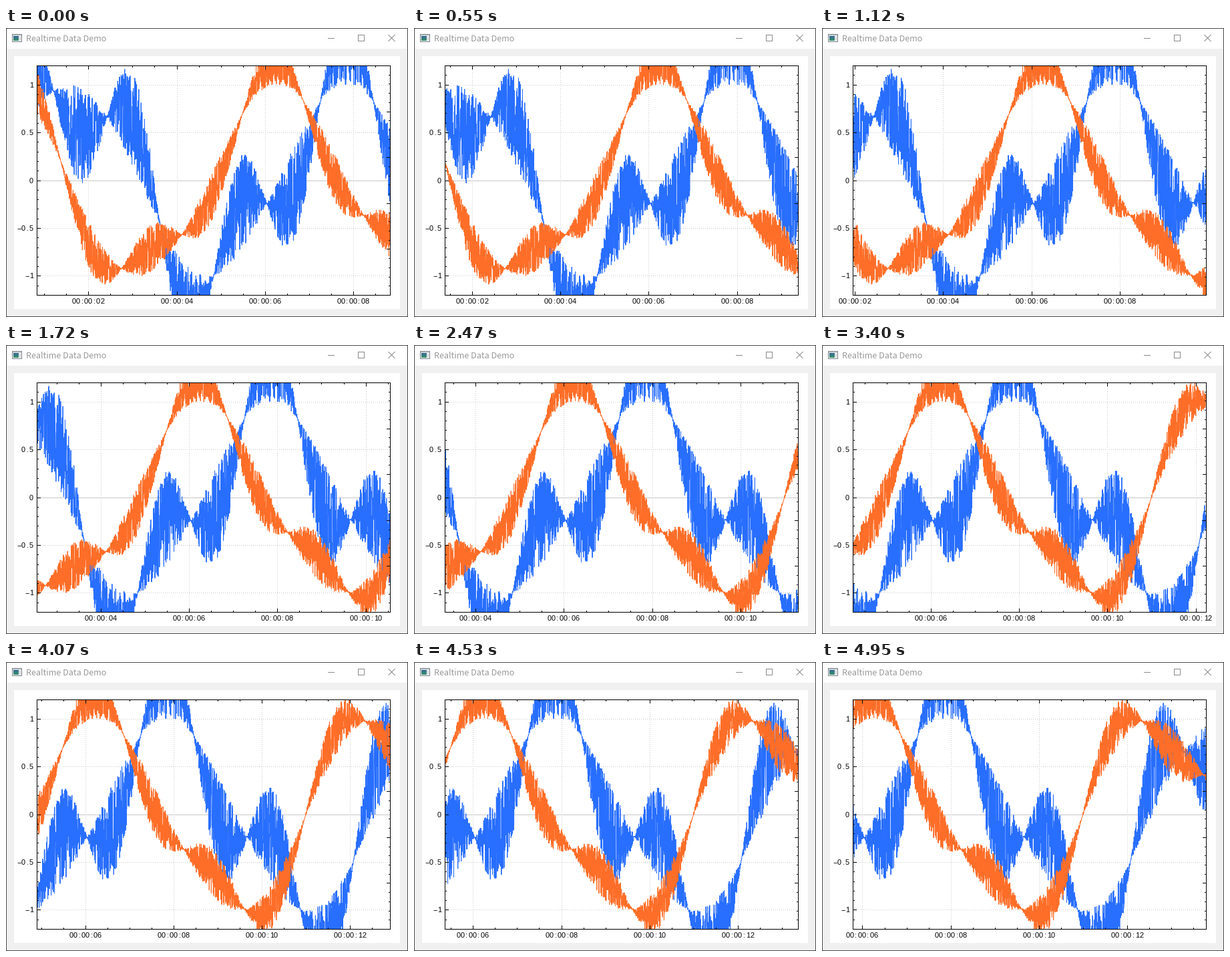
Animation of 602x432 px, one loop 5.05 s. Source, as a matplotlib script:

```python
import numpy as np
import matplotlib.pyplot as plt
from matplotlib.animation import FuncAnimation
from matplotlib.collections import LineCollection
from matplotlib.patches import Rectangle

W, H, DPI = 602, 432, 100
PX = 72 / DPI                      # one pixel in points
LOOP, INTERVAL = 5050, 25          # ms

# Plot area: axis lines sit on these pixel columns and rows
LEFT, RIGHT, TOP, BOTTOM = 46, 575, 56, 399
SPAN = 8.0                         # visible seconds
X_SCALE = (RIGHT - LEFT) / SPAN
START_KEY = 8.831                  # newest sample time at the start of the loop

BLUE, ORANGE = "#286eff", "#ff6e28"
GRID = "#c8c8c8"
BUTTON = "#8a8a8a"

# Replot bursts: first step, last step, number of steps
BURSTS = [(30, 550, 12), (600, 1120, 12), (1150, 1670, 12), (1720, 2230, 12),
          (2280, 2800, 12), (2850, 3370, 12), (3400, 3920, 12),
          (3970, 4480, 12), (4530, 4950, 10)]
STEPS = np.concatenate(
    [[0]] + [10 * np.ceil(np.linspace(a, b, n) / 10 - 1e-6) for a, b, n in BURSTS])

fig = plt.figure(figsize=(W / DPI, H / DPI), dpi=DPI, facecolor="#f0f0f0")
ax = fig.add_axes([0, 0, 1, 1])
ax.set_xlim(0, W)
ax.set_ylim(H, 0)
ax.axis("off")


def rect(x, y, w, h, color, z=0):
    patch = Rectangle((x, y), w, h, fc=color, ec="none", lw=0,
                      antialiased=False, zorder=z)
    ax.add_patch(patch)
    return patch


def strokes(segments, color, z, **kw):
    lines = LineCollection(segments, colors=color, linewidths=PX, zorder=z, **kw)
    lines.set_snap(False)
    ax.add_collection(lines, autolim=False)
    return lines


def hline(y, x0, x1):
    return [(x0, y + 0.5), (x1, y + 0.5)]


def vline(x, y0, y1):
    return [(x + 0.5, y0), (x + 0.5, y1)]


def y_pixel(value, low=-1.2, high=1.2):
    return BOTTOM - (value - low) / (high - low) * (BOTTOM - TOP)


def nearest(v):
    return int(np.floor(v + 0.5))


class CellLabel:
    """Text set in fixed 6 px character cells."""

    CELL = 6

    def __init__(self, length):
        self.chars = [ax.text(0, 0, "", family="Liberation Sans", size=11 * PX,
                              color="black", ha="center", va="baseline", zorder=6)
                      for _ in range(length)]

    def place(self, text, x, baseline):
        for i, (item, char) in enumerate(zip(self.chars, text)):
            item.set_text(char)
            item.set_position((x + self.CELL * i + self.CELL / 2, baseline))
            item.set_visible(True)

    def hide(self):
        for item in self.chars:
            item.set_visible(False)


def draw_window():
    rect(0, 0, W, 31, "white")
    rect(12, 42, 578, 378, "white")
    edge = "#4a4a4a"
    rect(0, 0, W, 1, edge, 1)
    rect(0, H - 1, W, 1, edge, 1)
    rect(0, 0, 1, H, edge, 1)
    rect(W - 1, 0, 1, H, edge, 1)

    # small window icon
    rect(9, 9, 15, 12, "#7c8288", 1)
    rect(10, 10, 13, 2, "#c9d0d6", 2)
    rect(10, 12, 13, 8, "#f4f6f7", 2)
    for i in range(7):
        rect(11, 12 + i, 8, 1, (0.22, 0.42 + 0.025 * i, 0.56 - 0.02 * i), 3)
    rect(20, 13, 2, 6, "#d0d4d8", 3)

    ax.text(30, 20, "Realtime Data Demo", family="Noto Sans CJK JP",
            size=12.6 * PX, color="#999999", va="baseline", zorder=3)

    strokes([hline(15, 482, 492),
             hline(10, 527, 537), hline(19, 527, 537),
             vline(527, 10, 20), vline(536, 10, 20),
             [(572.5, 10), (582.5, 20)],
             [(572.5, 20), (582.5, 10)]], BUTTON, 3)


def draw_fixed_axes():
    strokes([hline(nearest(y_pixel(v)), LEFT, RIGHT) for v in (-1, -0.5, 0.5, 1)],
            GRID, 1, linestyles=[(0, (1, 2))])
    strokes([hline(nearest(y_pixel(0)), LEFT, RIGHT)], GRID, 1)

    frame = [hline(TOP, LEFT, RIGHT + 1), hline(BOTTOM, LEFT, RIGHT + 1),
             vline(LEFT, TOP, BOTTOM + 1), vline(RIGHT, TOP, BOTTOM + 1)]
    for n in range(-12, 13):
        size = 3 if n % 5 else 6
        frame.append(hline(nearest(y_pixel(n / 10)), LEFT, LEFT + size))
    for n in range(26):
        size = 3 if n % 5 else 6
        y = nearest(y_pixel(n / 5, 0, 5))
        frame.append(hline(y, RIGHT + 1 - size, RIGHT + 1))
    strokes(frame, "black", 5)

    for v, text in ((1, "1"), (0.5, "0.5"), (0, "0"),
                    (-0.5, "\u22120.5"), (-1, "\u22121")):
        label = CellLabel(len(text))
        label.place(text, 41 - CellLabel.CELL * len(text), nearest(y_pixel(v)) + 4)


def make_trace(values, color, z):
    line, = ax.plot([], [], color=color, lw=PX, solid_joinstyle="bevel", zorder=z)
    line.set_clip_path(clip)
    return line, y_pixel(values) + 0.5


draw_window()
draw_fixed_axes()
clip = rect(LEFT, TOP + 1, RIGHT - LEFT, BOTTOM - TOP, "none")

# densely sampled noisy waves, one sample every few milliseconds
rng = np.random.default_rng(7)
keys = np.cumsum(rng.uniform(0.002, 0.004, 4800))
noise_a, noise_b = rng.random((2, keys.size))
traces = [
    make_trace(np.sin(keys) + noise_a * np.sin(keys / 0.3843), BLUE, 3),
    make_trace(np.cos(keys) + 0.5 * noise_b * np.sin(keys / 0.4364), ORANGE, 4),
]

time_grid = strokes([], GRID, 1, linestyles=[(0, (1, 2))])
time_ticks = strokes([], "black", 5)
time_labels = [CellLabel(8) for _ in range(5)]


def update(i):
    step = STEPS[np.searchsorted(STEPS, INTERVAL * (i + 1)) - 1]
    newest = START_KEY + step / 1000
    oldest = newest - SPAN

    a, b = np.searchsorted(keys, [oldest, newest])
    visible = slice(max(a - 1, 0), b)
    x = LEFT + 0.5 + (keys[visible] - oldest) * X_SCALE
    for line, y in traces:
        line.set_data(x, y[visible])

    grid, ticks, used = [], [], 0
    for label in time_labels:
        label.hide()
    # minor ticks every half second, major ticks every two seconds
    for n in range(int(np.ceil(oldest * 2)), int(np.floor(newest * 2)) + 1):
        px = nearest(LEFT + (n / 2 - oldest) * X_SCALE)
        major = n % 4 == 0
        size = 6 if major else 3
        ticks += [vline(px, TOP, TOP + size),
                  vline(px, BOTTOM + 1 - size, BOTTOM + 1)]
        if major:
            grid.append(vline(px, BOTTOM + 1, TOP + 1))
            time_labels[used].place(f"00:00:{n // 2:02d}", px - 24, 412)
            used += 1
    time_grid.set_segments(grid)
    time_ticks.set_segments(ticks)
    return []


anim = FuncAnimation(fig, update, frames=LOOP // INTERVAL, interval=INTERVAL,
                     repeat=True, repeat_delay=0, blit=False)
plt.show()
```
